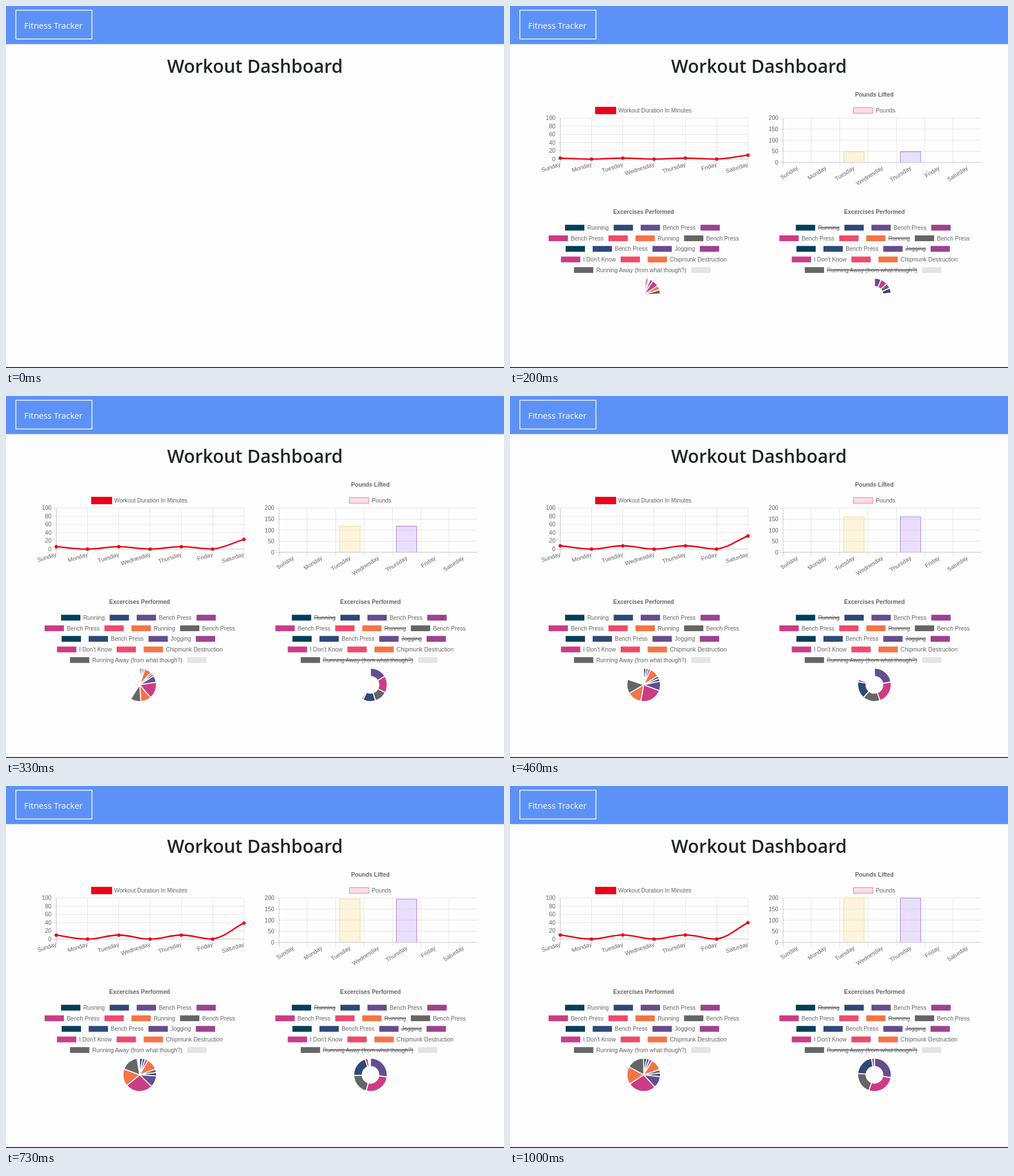
These frames come from a looping animation (877x639 px, 1060 ms). An HTML page:

```html
<!DOCTYPE html>
<html lang="en">
<head>
<meta charset="utf-8">
<title>Workout Dashboard</title>
<style>
  html, body { margin: 0; width: 100%; height: 100%; overflow: hidden; background: #fdfdfd; }
  svg { display: block; width: 877px; height: 639px; }
  .ui { font-family: "Open Sans", "Noto Sans", sans-serif; }
  #charts { font: 10.2px "Liberation Sans", Arial, sans-serif; fill: #666; }
</style>
</head>
<body>
<svg id="stage" viewBox="0 0 877 639">
  <rect width="877" height="639" fill="#fdfdfd"/>
  <rect width="877" height="67.3" fill="#5c92f7"/>
  <rect x="17.4" y="7.5" width="134" height="50.8" fill="none" stroke="#fff" stroke-width="1.4"/>
  <text class="ui" x="32" y="40" font-size="14.9" fill="#fff">Fitness Tracker</text>
  <text class="ui" x="438.5" y="118" font-size="31.9" font-weight="600" text-anchor="middle" fill="#212529">Workout Dashboard</text>
  <rect y="637.5" width="877" height="1.5" fill="#151515"/>
  <g id="charts"></g>
</svg>
<script>
const LOOP = 1060, FPS = 15, STEPS = 60;
const SCALE = 0.85; // chart units to stage pixels
const DAYS = ['Sunday', 'Monday', 'Tuesday', 'Wednesday', 'Thursday', 'Friday', 'Saturday'];
const MINUTES = [10, 0, 10, 0, 10, 0, 40];
const [TEAL, NAVY, PURPLE, PLUM, PINK, ROSE, ORANGE, GRAY, PALE] =
  ['#003f58', '#2d4979', '#654d90', '#9c4292', '#cc3c86', '#f04a6c', '#f67446', '#666', '#e4e4e4'];
const RED = '#ee0019';

const charts = document.getElementById('charts');

function add(tag, attrs, parent = charts) {
  const node = document.createElementNS('http://www.w3.org/2000/svg', tag);
  set(node, attrs);
  parent.append(node);
  return node;
}

function set(node, attrs) {
  for (const key in attrs) node.setAttribute(key, attrs[key]);
}

function label(text, x, y, attrs = {}) {
  const node = add('text', { x, y: y + 3.6, ...attrs });
  node.textContent = text;
  return node;
}

const title = (text, x, y) => label(text, x, y, { 'text-anchor': 'middle', 'font-weight': 'bold' });

function gridLine(d, strong) {
  add('path', { d, fill: 'none', stroke: '#000', 'stroke-opacity': strong ? 0.25 : 0.1, 'stroke-width': SCALE });
}

// Grid, value labels on the left and slanted day labels below.
function axes({ left, right, top, bottom, max, tick, columns, labelShift, angle }) {
  const pitch = (right - left) / columns;
  for (let v = 0; v <= max; v += tick) {
    const y = bottom - (bottom - top) * v / max;
    gridLine(`M${left - 7.5} ${y}H${right}`, v === 0);
    label(v, left - 8.5, y, { 'text-anchor': 'end' });
  }
  DAYS.forEach((day, i) => {
    const x = left + i * pitch;
    gridLine(`M${x} ${top}V${bottom + 8}`, i === 0);
    label(day, 0, 0, {
      'text-anchor': 'end',
      transform: `translate(${x + labelShift * pitch} ${bottom + 8.7}) rotate(${angle})`
    });
  });
}

// Duration line chart
const LINE = { left: 88.5, right: 419, top: 197.8, bottom: 270.2, max: 100, tick: 20, columns: 6,
  labelShift: 0, angle: -18 };
add('rect', { x: 150, y: 178, width: 37, height: 13, fill: RED });
label('Workout Duration In Minutes', 190.5, 184);
axes(LINE);
const curve = add('path', { fill: 'none', stroke: RED, 'stroke-width': 2.55 });
const dots = MINUTES.map(() => add('circle', { r: 3, fill: RED }));

// Spline whose handles follow the neighbours and stay above the axis.
function spline(points, tension = 0.4) {
  const gap = (a, b) => Math.hypot(b[0] - a[0], b[1] - a[1]);
  const handles = points.map((point, i) => {
    const prev = points[i - 1] || point, next = points[i + 1] || point;
    const before = gap(prev, point), after = gap(point, next);
    const handle = length => {
      const k = tension * length / (before + after);
      return [point[0] + k * (next[0] - prev[0]),
        Math.min(LINE.bottom, point[1] + k * (next[1] - prev[1]))];
    };
    return { in: handle(-before), out: handle(after) };
  });
  return `M${points[0]}` + points.slice(1).map((point, i) =>
    `C${handles[i].out} ${handles[i + 1].in} ${point}`).join('');
}

function drawLine(p) {
  const dx = (LINE.right - LINE.left) / LINE.columns;
  const dy = (LINE.bottom - LINE.top) / LINE.max;
  const points = MINUTES.map((m, i) => [LINE.left + i * dx, LINE.bottom - dy * m * p]);
  set(curve, { d: spline(points) });
  points.forEach(([cx, cy], i) => set(dots[i], { cx, cy }));
}

// Pounds bar chart
title('Pounds Lifted', 641.7, 156);
add('rect', { x: 604.8, y: 179.3, width: 34, height: 10, fill: '#fddde5', stroke: '#f08ca6', 'stroke-width': 1.2 });
label('Pounds', 644, 184);
axes({ left: 481, right: 830, top: 197.8, bottom: 276, max: 200, tick: 50, columns: 7,
  labelShift: 0.5, angle: -33 });
const bars = [
  { day: 2, color: 'rgb(255,206,86)', edge: '#f5de93' },
  { day: 4, color: 'rgb(153,102,255)', edge: '#a988e6' }
].map(({ day, color, edge }) => ({
  x: 481 + (day + 0.5) * 349 / 7 - 17.9,
  fill: add('path', { fill: color, 'fill-opacity': 0.2 }),
  edge: add('path', { fill: 'none', stroke: edge, 'stroke-width': 1.1 })
}));

function drawBars(p) {
  for (const { x, fill, edge } of bars) {
    const d = `M${x} 276V${276 - 78.2 * p}H${x + 35.8}V276`;
    set(fill, { d });
    set(edge, { d });
  }
}

// Exercise legends: an empty name is a colour box alone.
const LEGEND = [
  { x: 97, items: [['Running', TEAL, true], ['', NAVY], ['Bench Press', PURPLE], ['', PLUM]] },
  { x: 68, items: [['Bench Press', PINK], ['', ROSE], ['Running', ORANGE, true], ['Bench Press', GRAY]] },
  { x: 98, items: [['', TEAL], ['Bench Press', NAVY], ['Jogging', PURPLE, true], ['', PLUM]] },
  { x: 89.8, items: [["I Don't Know", PINK], ['', ROSE], ['Chipmunk Destruction', ORANGE]] },
  { x: 112.7, items: [['Running Away (from what though?)', GRAY, true], ['', PALE]] }
];

function legend(shift, strike) {
  title('Excercises Performed', 235.3 + shift, 363);
  LEGEND.forEach((row, r) => {
    let x = row.x + shift;
    const y = 391.3 + r * 18.7;
    for (const [name, color, struck] of row.items) {
      add('rect', { x, y: y - 5.1, width: 34, height: 10.2, fill: color });
      const width = name ? label(name, x + 39, y).getComputedTextLength() : 0;
      if (strike && struck) {
        add('path', { d: `M${x + 39} ${y}h${width}`, stroke: '#666', 'stroke-width': 1.7 });
      }
      x += 47.6 + width;
    }
  });
}

// Ring of slices that sweeps open from the top; returns its draw function.
function ring(cx, inner, slices) {
  const cy = 509.8, outer = 29.5;
  const total = slices.reduce((sum, [value]) => sum + value, 0);
  const paths = slices.map(([, fill]) =>
    add('path', { fill, stroke: '#fff', 'stroke-width': 1.7, 'stroke-linejoin': 'bevel' }));
  const at = (radius, turn) => {
    const a = 2 * Math.PI * turn;
    return `${cx + radius * Math.sin(a)} ${cy - radius * Math.cos(a)}`;
  };
  return p => {
    let from = 0;
    slices.forEach(([value], i) => {
      const to = from + p * value / total;
      const large = to - from > 0.5 ? 1 : 0;
      set(paths[i], {
        d: `M${at(outer, from)}A${outer} ${outer} 0 ${large} 1 ${at(outer, to)}` +
           `L${at(inner, to)}A${inner} ${inner} 0 ${large} 0 ${at(inner, from)}Z`
      });
      from = to;
    });
  };
}

legend(0, false);
legend(406.4, true);
const drawPie = ring(235.4, 0, [
  [5, TEAL], [5, PURPLE], [5, PINK], [20, ORANGE], [6, GRAY],
  [6, NAVY], [20, PURPLE], [48, PINK], [30, ORANGE], [30, GRAY]
]);
const drawDoughnut = ring(641.8, 14.75, [[100, PURPLE], [100, PINK], [75, GRAY], [75, NAVY], [10, PINK]]);

const easeOutQuart = t => 1 - (1 - t) ** 4;

function draw(ms) {
  // The picture steps at 15 fps, with frame starts cut to whole 10 ms.
  const tick = Math.floor((Math.floor(ms / 10) * 10 + 9.99) * FPS / 1000);
  charts.style.display = tick ? '' : 'none';
  // The first ticks lag while the charts are being set up.
  const step = tick < 3 ? tick : 4 * (tick - 2);
  const p = easeOutQuart(step / STEPS);
  drawLine(p);
  drawBars(p);
  drawPie(p);
  drawDoughnut(p);
}

const start = performance.now();
function loop() {
  draw((performance.now() - start) % LOOP);
  requestAnimationFrame(loop);
}
loop();
</script>
</body>
</html>
```
